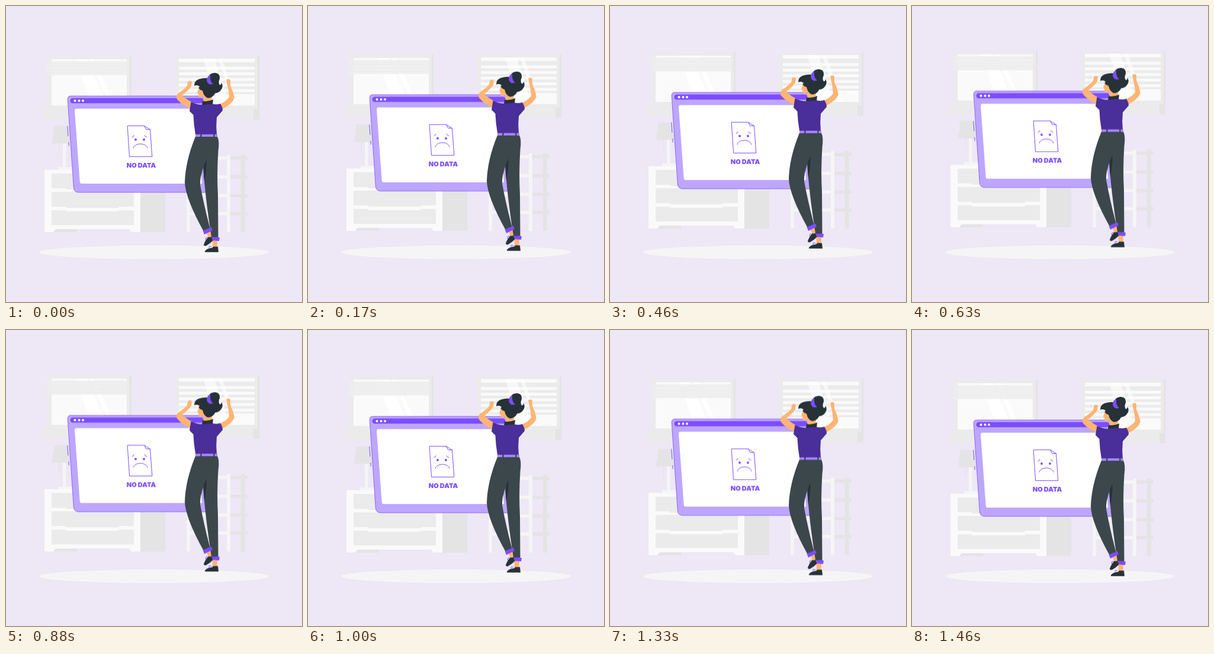
Write an HTML page that moves like this. It is 500 px wide and 500 px high and loops after 1500 ms.

```html
<!DOCTYPE html>
<html lang="en">
<head>
<meta charset="utf-8">
<title>No data</title>
<style>
  html, body { margin: 0; width: 100%; height: 100%; overflow: hidden; background: #ede7f6; }
  svg { display: block; width: 100vw; height: 100vh; }

  /* 18 held poses up, 18 held poses down */
  .float { animation: float 1500ms -5ms infinite; }
  @keyframes float {
    0%, 100% { transform: translateY(0); animation-timing-function: steps(18, jump-none); }
    50% { transform: translateY(-9.44px); animation-timing-function: steps(18, jump-none); }
  }

  .pale { fill: #f5f5f5; }
  .white { fill: #fafafa; }
  .grey { fill: #ebebeb; }
  .shade { fill: #e4e4e4; }
  .violet { fill: #7c4dff; }
  .lilac { fill: #bda6ff; }
  .dark { fill: #263238; }
  .skin { fill: #ffb573; }
  .pants { fill: #3c474c; }
  .line { fill: none; stroke: #7c4dff; stroke-width: 1; stroke-linecap: round; stroke-linejoin: round; }
  text { font: 900 11px Inter, "Open Sans", sans-serif; fill: #7c4dff; text-anchor: middle; }
</style>
</head>
<body>
<svg viewBox="0 0 500 500">
  <defs>
    <path id="drawer" class="grey" d="M77 0H216V25H192L189 27H103L100 25H77Z"/>
    <g id="rung">
      <path class="pale" d="M311 0H373V5.5H311Z"/>
      <path class="shade" d="M379 0H408V5.5H379Z"/>
    </g>
  </defs>

  <ellipse class="pale" cx="250" cy="416" rx="194" ry="11.5"/>

  <g class="float">
    <g id="left-window">
      <path class="shade" d="M204 84H212V174H204Z"/>
      <path class="grey" d="M70 84H209V174H70Z"/>
      <path class="white" d="M77 90H204V168H77Z"/>
      <path fill="#fff" d="M117 90H136L163 152H139ZM142 90H149L177 152H169Z"/>
      <path fill="#efefef" fill-opacity=".85" d="M69 93H205V117H69Z"/>
      <path stroke="#e6e6e6" stroke-width=".6" d="M69 97H205M69 101H205M69 105H205M69 109H205M69 113H205"/>
      <path class="grey" d="M63 174H210V191.500H63Z"/>
    </g>

    <g id="right-window">
      <path class="shade" d="M420 84H428V174H420Z"/>
      <path class="grey" d="M286 84H425V174H286Z"/>
      <path class="white" d="M292 89H420V95H292ZM292 149H420V168H292Z"/>
      <path stroke="#fafafa" stroke-width="5" d="M292 105H420M292 114.500H420M292 124H420M292 133.500H420M292 143H420"/>
      <path fill="#fff" fill-opacity=".6" d="M333 89H352L378 168H357ZM358 89H365L392 168H385Z"/>
      <path class="grey" d="M280 174H419V191.500H280Z"/>
      <path class="shade" d="M418 174H428V191.500H418Z"/>
    </g>

    <g id="lamp">
      <path class="pale" d="M96 232H101.500V273H96Z"/>
      <path class="shade" d="M82 202.500H108L113 232H77.500Z"/>
      <path stroke="#e4e4e4" d="M90.500 232V250"/>
      <path class="pale" d="M88 272H112V277H88Z"/>
    </g>

    <g id="dresser">
      <path class="shade" d="M227 276.500H269V382H227ZM80 377H120V382H80Z"/>
      <path class="white" d="M65 276.500H227V382H212L208 377H84L80 382H65Z"/>
      <use href="#drawer" y="283"/>
      <use href="#drawer" y="314"/>
      <path class="grey" d="M77 345H100L103 347H189L192 345H216V370H77Z"/>
    </g>

    <g id="shelf">
      <path class="shade" d="M397 251H403.500V382H397Z"/>
      <use href="#rung" y="254"/>
      <use href="#rung" y="286"/>
      <use href="#rung" y="317.500"/>
      <use href="#rung" y="348"/>
      <path class="pale" d="M305 251H311V382H305ZM373 251H379V382H373Z"/>
    </g>

    <g id="panel">
      <path class="lilac" stroke="#7c4dff" stroke-width=".8" d="M109 152H330Q336 152 336.500 158L346 307Q346 314.800 339 314.800H123Q115 314.800 114.300 307L104.200 158Q104 152 109 152Z"/>
      <rect class="violet" x="108.500" y="155.500" width="225" height="8.700" rx="4.300"/>
      <g fill="#fff">
        <circle cx="116.500" cy="160" r="2"/>
        <circle cx="123.500" cy="160" r="2"/>
        <circle cx="130" cy="160" r="2"/>
        <path d="M119 173.500H322L331 300H127.500Q125 300 124.700 297L116 177Q115.800 173.500 119 173.500Z"/>
      </g>
      <path class="line" d="M103.800 203L104.900 219.500M105.800 230.500L106.200 236"/>
      <path class="line" d="M205.500 202.400H233.500L243.500 208.800L246.800 254.400H209ZM233.500 202.400L236.500 208.300L243.500 208.800"/>
      <path class="line" d="M213 221.500Q215.500 221 216 218.500M234 218.500Q235 221 238 221.500M215 240C217 230.500 237 230.500 239 240"/>
      <circle class="violet" cx="219" cy="225.700" r="2"/>
      <circle class="violet" cx="233" cy="225.700" r="2"/>
      <text x="228.500" y="272.600">NO DATA</text>
    </g>

    <g id="woman">
      <!-- arms -->
      <path class="skin" d="M307.500 128Q309 125.500 314 127.500L313 135.500Q309 142 297.500 151Q304 157 315 163L312 174Q297 167 289 157.500Q286.500 152 290.500 147.500Q301 141 306 135Z"/>
      <path class="skin" d="M372 125Q375 121.500 379 125L379 134Q385 147 385.700 156Q381 167 364 175L361 166Q372 161 377 154Q376.500 143 373.500 132Z"/>

      <!-- feet -->
      <path class="skin" d="M338 383L346 379L350 390L344 394ZM348.500 395H357L356.500 408H349Z"/>
      <path class="dark" d="M334 403Q337 395 342 390Q346 392 351 386.500Q354 387 355 390.500L351 395Q345 401 338 405Q334 406 334 403ZM336 414Q339 410 345 409Q349 409 350 406.500H358L359 415.800H337Q335 415.500 336 414Z"/>
      <path class="line" stroke-width=".7" d="M337.500 395Q336 390 341 391M343 408.500Q342 404 347 407"/>

      <!-- trousers -->
      <path class="pants" d="M334 220.500H357Q361 228 358.500 245Q356 285 358 320L358.500 391L347 390Q336 320 333 270Z"/>
      <path class="dark" d="M338 256Q340 272 335 296Q333 280 334 269Z"/>
      <path class="pants" d="M320 220.500H350Q343 250 335 268Q327 290 328 302Q334 335 344.500 375L334 381Q303 325 302 298Q303 262 320 220.500Z"/>
      <path class="violet" d="M332.500 379.500L347 373.500L349 379L335 386ZM347 390L361 391L360 397L349 396Z"/>

      <!-- head -->
      <path class="skin" d="M326 137L323 146.500L325 148L325.500 153Q329 156 333 152L334 162H347L350 140Z"/>
      <path class="dark" d="M332 160.500Q341 162 350 158L349 166.500L331 167.500Z"/>
      <path class="dark" d="M318 135Q318 126 326 123.500Q334 121 342 122Q357 127 355 142Q352 155 341 155.500Q334 153 332 143Q327 142 325.500 138Q328 135 326 135.500Q322 133 318 135Z"/>
      <path class="dark" d="M342 119Q346 112 354 113Q362 114 361 123Q358 129 361 133.500Q364 133 364 129.500Q368 136 363 142Q359 148 351 147Q346 138 344 130Z"/>
      <path class="violet" d="M341 119Q336 128 344 132.500L350 132Q344 127 345 117Z"/>

      <!-- shirt and belt -->
      <path fill="#4a2e99" d="M312.500 162Q322 167 331 167L349 165.500Q357 167 362 165Q366 171 366 176.500L356 188Q354.500 203 356 217H320Q317 200 316.500 184L310 177.500Z"/>
      <path class="lilac" style="fill:#a685ff" d="M320 216.800H357V220.800H320Z"/>
      <path class="dark" d="M328.500 216.300H330.300V221.300H328.500ZM350.500 216.300H352.300V221.300H350.500Z"/>
    </g>
  </g>
</svg>
</body>
</html>
```
